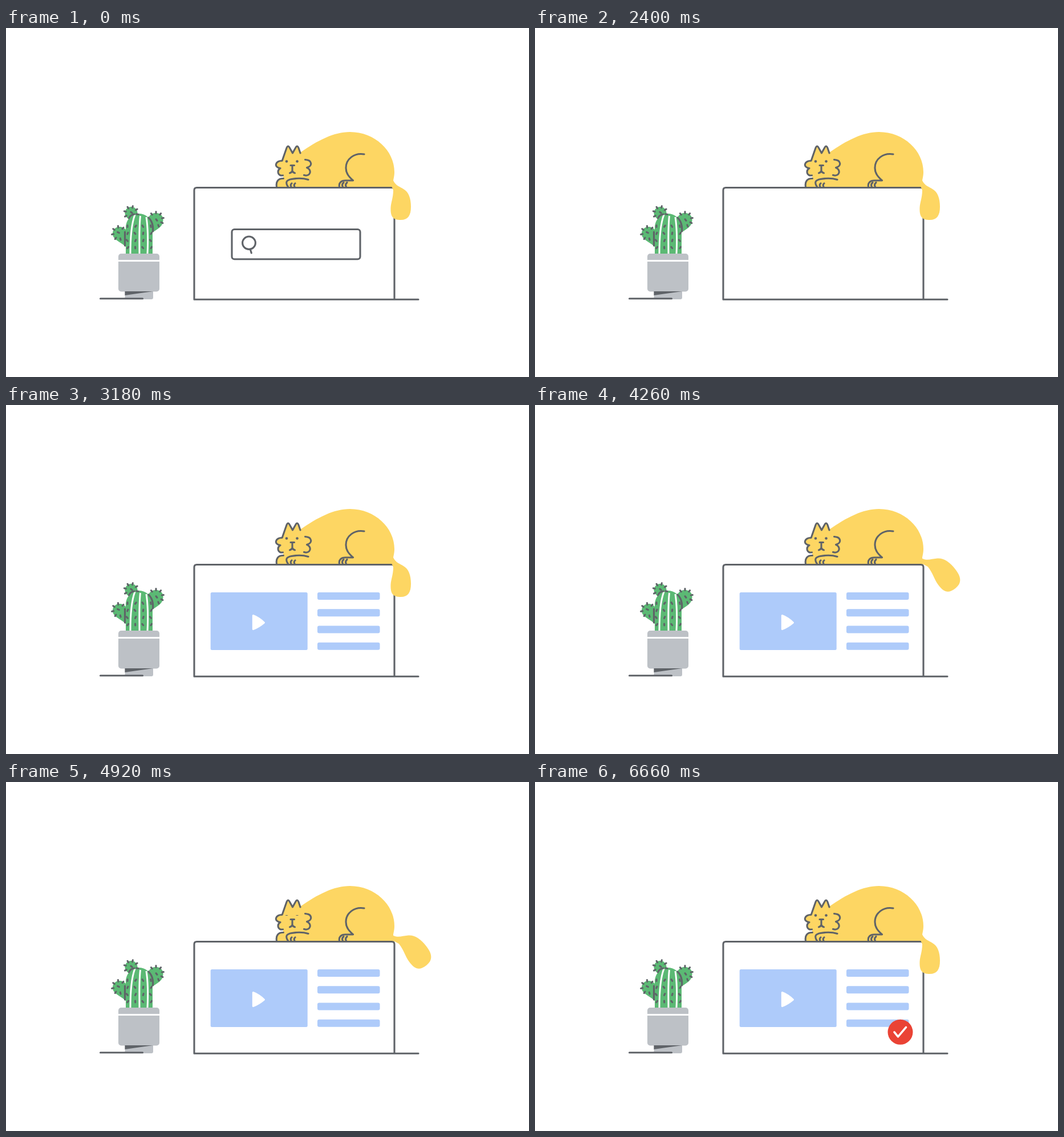
An HTML page that plays this animation: 917 by 611 pixels, repeating every 8.16 s.

```html
<!DOCTYPE html>
<html lang="en">
<head>
<meta charset="utf-8">
<title>Cat on a screen</title>
<style>
  html, body { margin: 0; width: 100%; height: 100%; overflow: hidden; background: #fff; }
  svg { display: block; width: 100%; height: 100%; }
  .line, .white, #query { fill: none; stroke-linecap: round; stroke-linejoin: round; }
  .line { stroke: #5f6368; stroke-width: 3.1; }
  .white { stroke: #fff; stroke-width: 3; }
  .butt { stroke-linecap: butt; }
  #query { stroke: #aecbfa; stroke-width: 6; }
  #check { stroke-width: 3.6; }
  .dark { fill: #5f6368; }
  .yellow { fill: #fdd663; }
  .blue { fill: #aecbfa; }
  .green { fill: #5bb974; }
  .grey { fill: #bdc1c6; }
</style>
</head>
<body>
<svg viewBox="0 0 917 611">
  <clipPath id="screen"><rect x="331" y="280" width="349" height="194"/></clipPath>

  <g id="plant">
    <path class="green" d="M210 396V350C210 334 222 325 233 325C246 325 257 335 257 350V396Z"/>
    <circle class="green" cx="219.5" cy="324" r="11"/>
    <path class="green" d="M250 332C254 320 275 321 275.500 335C276 347 267 351 257 358Z"/>
    <path class="green" d="M210 353C202 344 187 348 187 360C187 371 201 374 210 383Z"/>
    <path class="white butt" d="M226 327C219 345 218 370 218 396M235.500 329C233 350 234 375 234 396M246 331C249 350 249 375 248 396"/>
    <path class="line" d="M215.500 333Q218 327 225 326M250 332Q259 341 257.500 356M208.500 357V381"/>
    <path class="line" id="spines"/>
    <rect class="grey" x="197" y="395" width="72" height="66.500" rx="5"/>
    <path class="white butt" d="M197 407.500H269"/>
    <path class="grey" d="M208.500 461H258V472Q258 475 255 475H211Q208.500 475 208.500 472Z"/>
    <path class="dark" d="M208.500 461H258L208.500 468Z"/>
    <path class="line" d="M165.500 473.700H239.500"/>
  </g>

  <g clip-path="url(#screen)">
    <g id="page">
      <rect class="blue" x="358.700" y="328" width="170" height="101" rx="2.500"/>
      <path d="M433.300 368.500Q443 372 452.500 381Q443 389 433.300 392.500Z" fill="#fff" stroke="#fff" stroke-width="3" stroke-linejoin="round"/>
    </g>
  </g>

  <g id="search">
    <rect class="line" x="396" y="352.500" width="225" height="52.300" rx="4.500"/>
    <ellipse class="line" cx="426" cy="376.200" rx="11.400" ry="11.200"/>
    <path class="line" d="M428.300 387.500L430.300 394"/>
    <path id="query"/>
  </g>

  <g id="cat">
    <path class="yellow" d="M474 279C473 269 478 264 486 264V259C477 259 475 250 480 245C470 243 472 231 484 232L494 207L502 219L510 207L516 218C546 197 575 182 603 182C647 182 681 215 681 252C681 260 679 265 679 268L681 279Z"/>
    <path class="yellow" d="M520 230C535 229 538 242 529 244.500C537 248 534 260 522 259Z"/>
    <path class="line" d="M484.500 231.500L492 210Q494.500 204 497.500 210L502.500 219L507.500 210Q510.500 204 513 210L516 219"/>
    <path class="line" d="M484 232.500C472 232 469 244 481 245.500C474 250 477 260 485.500 258"/>
    <path class="line" d="M524.500 230.500C537 231 538 242 527.500 244.500C537 248 534 261 522.500 257.500"/>
    <path class="line" d="M486.500 263.500C477 263 473 269 474.500 278M494.500 278C489 270 492 266 501 264.500C512 262.500 522 263 530 265.500M500 278Q498 274 501 272M506 278Q504 274 507 272"/>
    <path class="line" d="M499 240.500H505.500M502 241V250M497.500 254Q501 253 502 250Q503 253 506.500 254"/>
    <path class="line" d="M628 221C611 218 596 229 596 245C596 255 602 261 608.500 267H595C588 267 583 271 584.500 278M590.500 278Q588 274 592 270.500M596.500 278Q594 274 598 270.500"/>
    <ellipse class="dark eye" cx="492" cy="233.500" rx="2.300"/>
    <ellipse class="dark eye" cx="510.500" cy="233.500" rx="2.300"/>
  </g>

  <path class="line" d="M330 475V284Q330 279.500 334.500 279.500H676.500Q681 279.500 681 284V475M330 475.300H723"/>
  <path class="yellow" id="tail" d="M-1 -3C3 6 11 8 17 12C26 17 30 28 30 43C30 58 25 66 12 66C-1 66 -6 61 -5.500 45C-5 35 -1 27 -1 14L-4 7Z"/>

  <g id="badge">
    <circle r="22" fill="#ea4335"/>
    <path class="white" id="check" d="M-10.500 0L-4 8L10 -8.500"/>
  </g>
</svg>

<script>
const LOOP = 8160, STEP = 60, TURN = 2 * Math.PI;
const $ = id => document.getElementById(id);
const clamp = x => Math.min(1, Math.max(0, x));
const smooth = x => { x = clamp(x); return x * x * (3 - 2 * x); };
const show = (el, on) => el.style.display = on ? "" : "none";
const scaleAt = (x, y, sx, sy = sx) => `translate(${x} ${y}) scale(${sx} ${sy})`;
const eyes = document.querySelectorAll(".eye");

function spine(x, y, angle) {
  const dx = 1.5 * Math.cos(angle), dy = 1.5 * Math.sin(angle);
  return `M${x - dx} ${y - dy}L${x + dx} ${y + dy}`;
}

// Spines pointing outwards along an arc, given in turns.
function ring(cx, cy, r, from, to, count) {
  let d = "";
  for (let i = 0; i < count; i++) {
    const a = TURN * (from + (to - from) * i / (count - 1));
    d += spine(cx + r * Math.cos(a), cy + r * Math.sin(a), a);
  }
  return d;
}

function drawSpines() {
  let d = ring(219.5, 324, 11, 0.42, 1.03, 6)
    + ring(263, 335, 12, -0.36, 0.19, 6)
    + ring(198, 359, 11, 0.21, 0.86, 6)
    + spine(197, 358, 0.5) + spine(220, 323, 0.7) + spine(264, 336, 0.9);
  for (let column = 0; column < 4; column++) {
    for (let row = 0; row < 4; row++) {
      const lean = 0.7 * Math.sin(column * 2 + row * 2.5);
      d += spine(213 + column * 13.7 + lean, 347 + row * 12.5, Math.PI / 2 + lean);
    }
  }
  $("spines").setAttribute("d", d);
}

function buildRows() {
  for (let i = 0; i < 4; i++) {
    $("page").insertAdjacentHTML("beforeend",
      `<rect class="blue" x="546" y="${328 + i * 29.25}" width="109.500" height="13" rx="3"/>`);
  }
}

// Swing of the tail: 0 hangs down, positive lifts it to the right.
function tailSwing(t) {
  if (t < 4260 || t >= 5580) return 0;
  if (t < 5040) return 1.3 * Math.sin((t - 4214) / 330 * TURN);
  return -Math.sin((t - 5040) / 540 * Math.PI);
}

function render(time) {
  const t = Math.floor(time % LOOP / STEP) * STEP;

  show($("search"), t < 2400);
  const typed = smooth(Math.floor((t - 300) / 120) / 9);
  show($("query"), typed > 0);
  $("query").setAttribute("d", `M463 379.300H${Math.max(463.1, 457 + 140 * typed)}`);
  const close = clamp((t - 1860) / 540) ** 2;
  $("search").setAttribute("transform",
    scaleAt(508.5, 378.5, 1 - close, 1 + 0.57 * close) + " translate(-508.5 -378.5)");

  show($("page"), t >= 2760);
  $("page").setAttribute("transform", `translate(0 ${150 * (1 - smooth((t - 2700) / 480))})`);

  const swing = tailSwing(t);
  $("tail").setAttribute("transform",
    scaleAt(680, 270, 1 + 0.14 * Math.abs(swing)) + ` rotate(${-38 * swing})`);
  const open = Math.min(1, Math.max(0.25, Math.abs(t - 4920) / 120));
  eyes.forEach(eye => eye.setAttribute("ry", 2.3 * open));

  show($("badge"), t >= 6360);
  $("badge").setAttribute("transform", scaleAt(640.5, 437.8, smooth((t - 6300) / 360)));
}

drawSpines();
buildRows();
const start = performance.now();
function tick() {
  render(performance.now() - start);
  requestAnimationFrame(tick);
}
tick();
</script>
</body>
</html>
```
